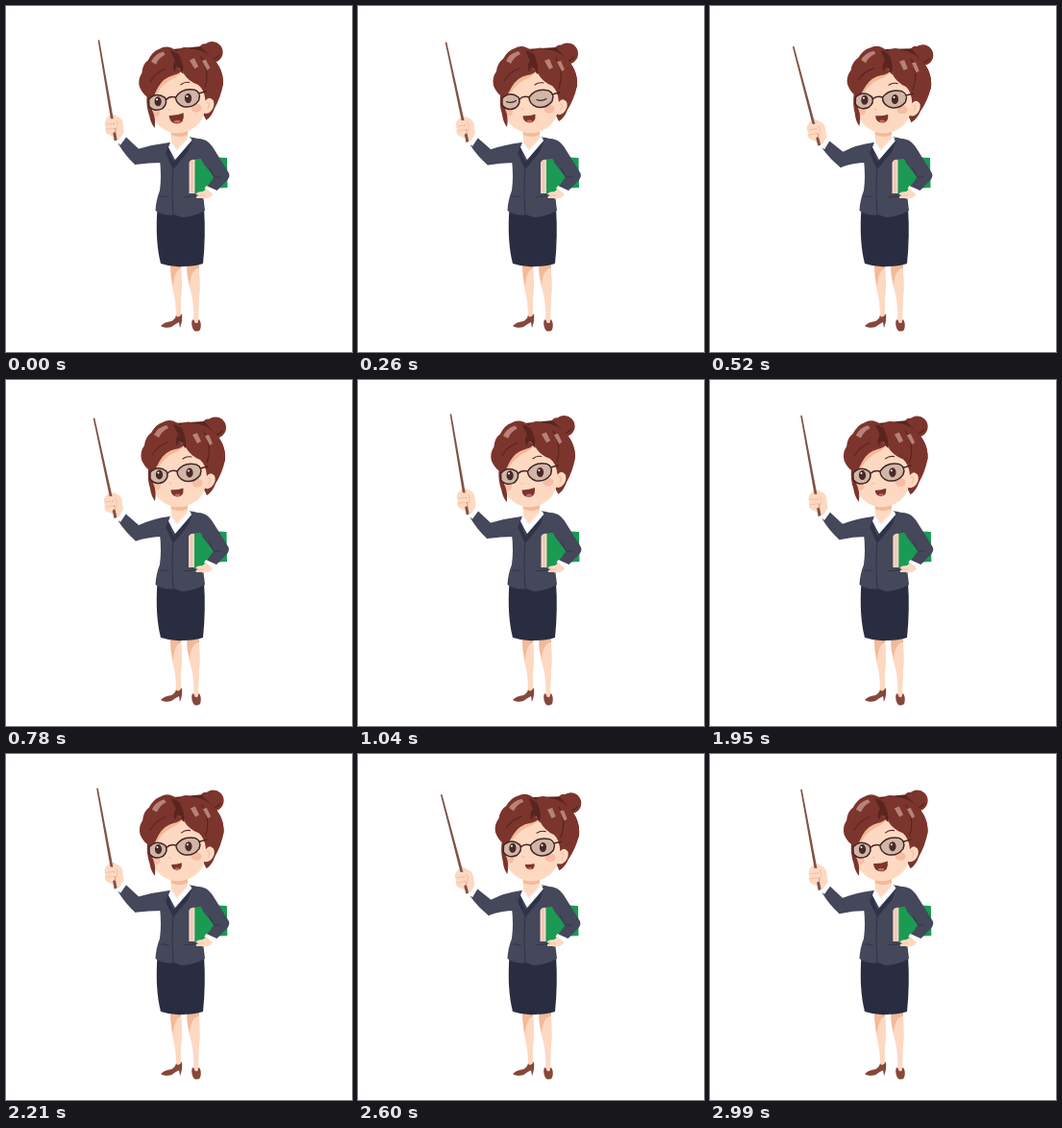
Recreate the animation shown at these times as an HTML page with a canvas. Size 360 px wide and 360 px high, loop 3120 ms.

```html
<!DOCTYPE html>
<html lang="en">
<head>
<meta charset="utf-8">
<title>Teacher with pointer</title>
<style>
html, body { margin: 0; width: 100%; height: 100%; overflow: hidden; background: #fff; }
canvas { display: block; width: 360px; height: 360px; }
</style>
</head>
<body>
<canvas id="stage" width="360" height="360"></canvas>
<script>
const ctx = document.getElementById('stage').getContext('2d');
const LOOP = 3120, STEP = 130, SWAY = 1040;
const C = {
  skin: '#fdd9c2', shade: '#f3b999', blush: '#f6bda5', hair: '#7b352c', dark: '#5a2520',
  shine: '#b98276', suit: '#45475a', fold: '#303247', skirt: '#2a2c41', green: '#1a9a52',
  frame: '#472424', lens: '#cfb6a7', mouth: '#7d342d', shoe: '#87473b', wood: '#825244'
};

// [time, openness] pairs for the talking mouth
const TALK = [[0, 1], [260, .7], [780, .7], [1430, .9], [1950, .5], [2600, .25], [2990, .95], [3120, 1]];

function fill(color, d) {
  ctx.fillStyle = color;
  ctx.fill(new Path2D(d));
}

function line(color, width, d) {
  ctx.strokeStyle = color;
  ctx.lineWidth = width;
  ctx.lineCap = ctx.lineJoin = 'round';
  ctx.stroke(new Path2D(d));
}

function oval(color, x, y, rx, ry, turn = 0) {
  ctx.fillStyle = color;
  ctx.beginPath();
  ctx.ellipse(x, y, rx, ry, turn, 0, Math.PI * 2);
  ctx.fill();
}

function pivot(x, y, angle, dx, dy, draw) {
  ctx.save();
  ctx.translate(x + dx, y + dy);
  ctx.rotate(angle);
  ctx.translate(-x, -y);
  draw();
  ctx.restore();
}

function sample(keys, t) {
  const i = keys.findIndex(k => k[0] > t);
  const [t0, a] = keys[i - 1], [t1, b] = keys[i];
  return a + (b - a) * (t - t0) / (t1 - t0);
}

function drawLegs() {
  fill(C.skin, 'M171 267H182Q184 291 182 306L182 325L176 328Q178 316 175 301Q171 286 171 267Z');
  fill(C.skin, 'M188 267H200Q203 288 201 304L200 330H195Q196 314 193 300Q188 285 188 267Z');
  fill(C.shade, 'M171 269L182 268V273Q175 275 174 292Q171 282 171 269ZM188 269L201 267V273Q193 273 191 290Q188 280 188 269Z');
  fill(C.shoe, 'M183 320Q184 328 181 335L180 329Q176 331 172 334Q165 336 161 333Q164 329 172 328Q176 326 177 322Q179 326 183 320Z');
  fill(C.shoe, 'M194 326Q198 330 201 326Q204 331 202 337Q198 340 195 337Q192 331 194 326Z');
  oval(C.skin, 198, 328, 2, 2);
  fill(C.skirt, 'M157.500 210Q155 245 161 268Q173 272 184 271Q197 271 205 268Q208 239 206 210Z');
}

function drawTorso() {
  fill(C.suit, 'M170 142L189 136Q203 137 211 146L207 168Q203 184 205 196L207 213Q196 219 183 220L175 217Q165 219 155.500 213Q156 202 160 192Q162 177 160 160L164 145Z');
  fill(C.fold, 'M169 144Q171 155 174 162L190 145L194 139L189 152L174 170L165 151Z');
  fill('#fff', 'M172 139L178 147L189 135L194 139L176 160L169 147Z');
  fill(C.skin, 'M171 127H189V137L178 149L172 141Z');
  fill(C.shade, 'M172 130L189 127V134Q180 138 172 134Z');
  line('#dfe2ea', .8, 'M172 142L178 150L189 138');
  line(C.fold, 1, 'M174 168Q172 190 174 217M161 198Q166 197 169 199M185 199L202 197');
}

function drawBookArm(shift) {
  ctx.save();
  ctx.translate(shift, 0);
  fill(C.green, 'M194 160L212 157L229.500 158L230 189L212 190L196 196Z');
  fill('#f6d3c2', 'M190 163Q192 159 196 160V195H190Z');
  line('#d8b5a5', .6, 'M193 162V194');
  fill(C.suit, 'M192 138Q208 136 214 146Q221 157 231.500 174Q233 178 229 182L217 194L208 189L216 178L205 164Z');
  line(C.fold, .8, 'M216 178L211 168M217 178L223 178');
  fill('#fff', 'M208 187L219 192L216 196L206 190Z');
  fill(C.skin, 'M208 190L215 196Q210 202 203 200L198 200Q196 198 200 197L197 196Q198 193 205 193Z');
  line(C.shade, .7, 'M200 197L206 197');
  ctx.restore();
}

function drawPointerArm(sway, lag) {
  const dx = -.6 * sway, dy = -1.5 * sway - lag;
  const ex = 135 + dx, ey = 166.5 + dy;
  fill(C.suit, `M170 142Q153 144 ${ex + 2} ${ey - 16}L${ex - 4} ${ey - 5}L${ex} ${ey}Q149 163 163 163Z`);
  pivot(136, 160, .045 * sway, dx, dy, () => {
    fill(C.suit, 'M122 136L138 150L143 163L135 166.500Q124 157 117 146Z');
    fill('#fff', 'M121 133L125 138L119 147L115 143Z');
    fill(C.skin, 'M104 119Q109 113 114 117Q121 119 121 127L122 134L117 142Q111 138 105 136Q101 133 103 128Q100 124 104 119Z');
    fill(C.wood, 'M90.700 38.800L92.300 38.500L115.400 142L112.500 143Z');
    fill(C.skin, 'M104 121Q110 119 113 121Q115 124 111 125Q115 128 112 130Q115 133 110 135Q103 134 103 129Q101 125 104 121Z');
    line(C.shade, .8, 'M104 126L111 125M104 131L112 130M114 122Q117 127 113 134');
  });
}

function drawEye(x, y, shut) {
  if (shut > .8) {
    line(C.frame, 1.2, `M${x - 5} ${y + 1}Q${x} ${y + 3} ${x + 5} ${y}`);
    return;
  }
  oval('#4b2826', x, y, 3.6, 5 * (1 - shut));
  oval('#fff', x - 1, y - 2 * (1 - shut), 1, 1);
}

function drawFace(talk, shut) {
  fill(C.skin, 'M150 77Q166 62 184 65Q204 70 209 94Q210 116 199 125Q188 134 174 132Q157 127 153 112Q148 96 150 77Z');
  fill(C.shade, 'M153 92Q156 80 169 73L186 69L179 74Q166 79 159 90Z');
  oval(C.blush, 157, 110, 4, 4.5);
  oval(C.blush, 199, 107, 5.5, 4.5);
  const w = 3.8 + 3.8 * talk, h = 2.5 + 3 * talk, x = 178, y = 117;
  fill(C.mouth, `M${x - w} ${y - h * .6}Q${x} ${y - h * .5} ${x + w} ${y - h}Q${x + w + 1} ${y + h} ${x} ${y + h}Q${x - w} ${y + h * .8} ${x - w} ${y - h * .6}Z`);
  oval('#c96a5c', x + .5, y + h * .6, w * .45, h * .28);
}

function drawGlasses(shut) {
  oval(C.lens, 159, 99.500, 9.5, 8);
  oval(C.lens, 190.500, 96.500, 12, 9);
  drawEye(159.500, 98.500, shut);
  drawEye(191, 96.500, shut);
  line(C.frame, 1.5, 'M150 96Q158 88 167 95Q170 101 164 106Q155 110 150 103ZM178 95Q185 85 198 88Q205 91 202 99Q196 107 186 105Q178 102 178 95ZM168 97Q172 93 178 95M202 92L210 90');
  line(C.dark, 1.1, 'M184 82Q188 79 193 80');
  line(C.shade, 1, 'M170 107L172 108');
}

function drawBackHair() {
  oval(C.hair, 218, 49.500, 11, 11);
  oval(C.hair, 210, 46.500, 5.5, 6);
  line(C.dark, 1.3, 'M208 57Q217 61 225 53');
  fill(C.dark, 'M174 45L206 43L218 56L222 78L207 84L182 70Z');
  fill(C.hair, 'M205 50L216 54Q229 66 228 83Q225 97 218 108Q215 116 209 120L206 114L207 90Z');
}

function drawFrontHair() {
  fill(C.skin, 'M207 99Q212 94 217 99Q219 105 215 110Q211 115 206 112Z');
  line(C.shade, 1, 'M210 102Q215 101 211 108');
  fill(C.hair, 'M181 47Q188 41 195 45Q207 46 215 53Q229 65 228 83Q224 95 218 101Q213 94 209 100Q208 88 202 83Q192 79 187 70Q187 56 181 47Z');
  fill(C.hair, 'M181 47Q172 39 163 44Q156 46 151 55Q145 59 144 68Q139 75 141 83Q144 90 148 93Q147 104 150 113Q151 121 155 126Q157 116 153 107Q153 95 160 84Q166 74 176 72Q182 71 185 68L178 60Q187 57 181 47Z');
  fill(C.dark, 'M174 46Q184 48 185 56Q188 62 187 71Q184 69 182 62Q179 64 178 69Q175 62 179 57Z');
  line(C.dark, 1.2, 'M206 54Q215 69 209 86M152 78Q157 69 168 65');
  fill(C.shine, 'M154 57Q158 49 167 47L169 50Q162 53 159 60ZM194 57L199 55L203 64L199 66ZM207 58L211 57L215 66L212 68Z');
}

function draw(t) {
  const phase = 2 * Math.PI * t / SWAY, sway = Math.cos(phase);
  const shut = Math.max(0, 1 - Math.abs(t - 260) / 170);
  ctx.fillStyle = '#fff';
  ctx.fillRect(0, 0, 360, 360);
  drawLegs();
  drawTorso();
  drawPointerArm(sway, Math.sin(phase));
  drawBookArm(sway * .5);
  pivot(178, 133, -.04 * sway, 0, 0, () => {
    drawBackHair();
    drawFace(sample(TALK, t), shut);
    drawFrontHair();
    drawGlasses(shut);
  });
}

const start = performance.now();
function tick() {
  const t = (performance.now() - start) % LOOP;
  draw(Math.floor(t / STEP) * STEP);
  requestAnimationFrame(tick);
}
tick();
</script>
</body>
</html>
```
